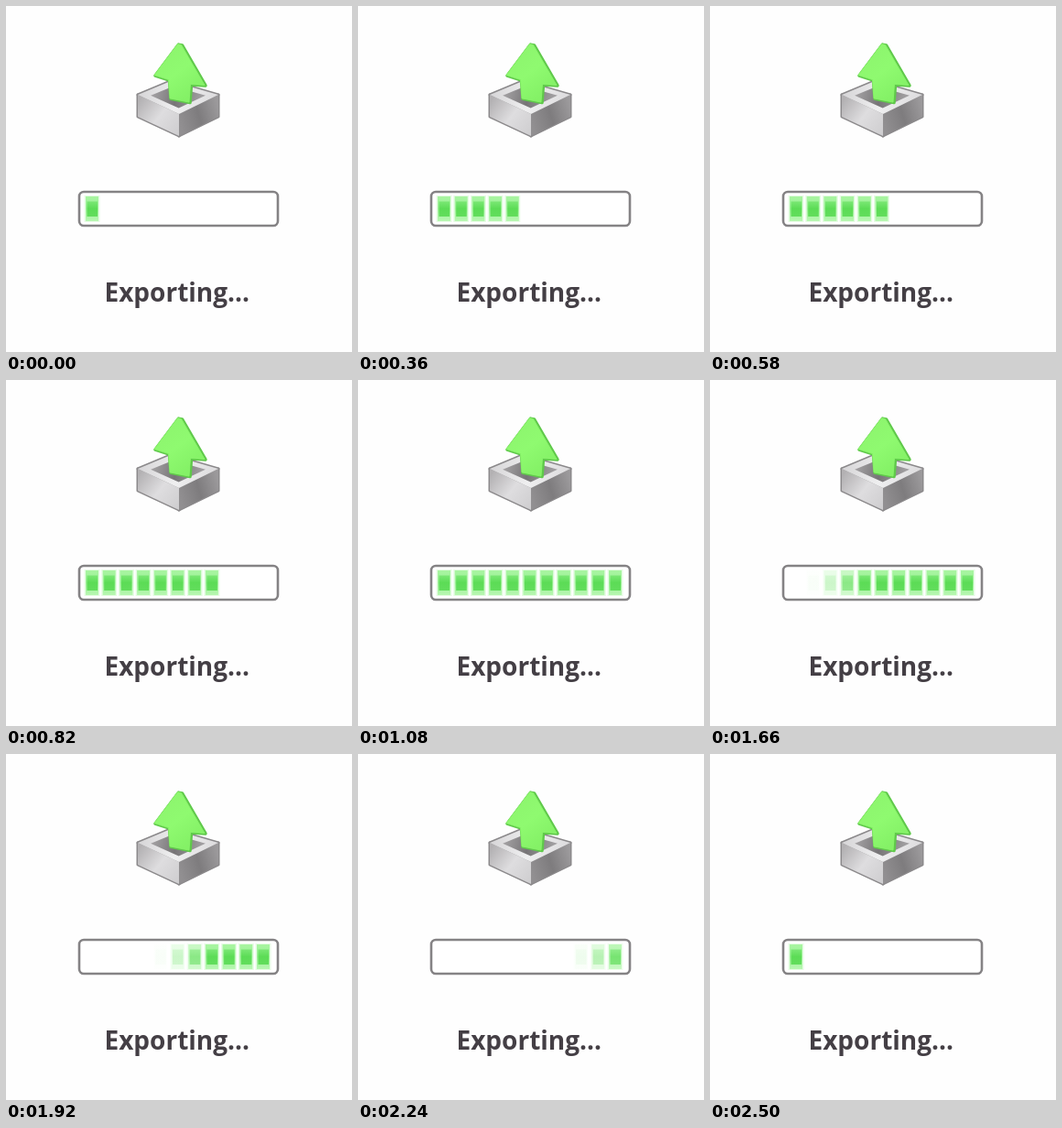
These frames come from a looping animation (378 px wide and 378 px high, 2.52 s). An HTML page with a canvas:

```html
<!DOCTYPE html>
<html lang="en">
<head>
<meta charset="utf-8">
<title>Exporting</title>
<style>
html, body { margin: 0; width: 100%; height: 100%; overflow: hidden; background: #fefefe; }
canvas { display: block; filter: blur(0.6px); }
</style>
</head>
<body>
<canvas id="stage" width="378" height="378"></canvas>
<script>
const ctx = document.getElementById('stage').getContext('2d');
const LOOP = 2520;
const BLOCKS = 11;
const FILL = { start: -104, step: 116 };
const CLEAR = { start: 1320, step: 87, fade: 300 };

function polygon(points, fill, stroke, width) {
  ctx.beginPath();
  points.forEach(([x, y]) => ctx.lineTo(x, y));
  ctx.closePath();
  ctx.fillStyle = fill;
  ctx.fill();
  if (!stroke) return;
  ctx.strokeStyle = stroke;
  ctx.lineWidth = width;
  ctx.lineJoin = 'round';
  ctx.stroke();
}

function gradient(x0, y0, x1, y1, ...colors) {
  const g = ctx.createLinearGradient(x0, y0, x1, y1);
  colors.forEach((c, i) => g.addColorStop(i / (colors.length - 1), c));
  return g;
}

const shift = (points, dx, dy) => points.map(([x, y]) => [x + dx, y + dy]);

function drawTray() {
  const rim = [[144, 97], [180, 82], [232, 97], [189, 118]];
  const [left, , right, front] = rim;
  const hole = rim.map(([x, y]) => [188 + (x - 188) * 0.68, 99 + (y - 99) * 0.66]);
  const side = (a, b) => [a, b, ...shift([b, a], 0, 24)];

  const leftFace = side(left, front);
  const rightFace = side(front, right);
  [leftFace, rightFace, rim].forEach(p => polygon(p, '#999', '#8b898b', 3));
  polygon(leftFace, gradient(144, 105, 188, 140, '#b3b1b3', '#dedddf', '#cfced0'));
  polygon(rightFace, gradient(189, 125, 232, 112, '#918f91', '#7e7c7e', '#9b999b'));
  polygon(rim, gradient(145, 90, 230, 110, '#d6d5d7', '#efeff0', '#dcdbdd'));
  polygon(hole, gradient(160, 92, 212, 106, '#a4a2a4', '#777577', '#a09ea0'));
}

function drawArrow() {
  // Half outline mirrored around the axis, then tilted.
  const half = [[2, 1], [27.5, 40], [12, 42], [10.5, 62]];
  const mirrored = half.map(([x, y]) => [-x, y]).reverse();
  const arrow = [...half, ...mirrored].map(([x, y]) => [189.5 + x, 41 + y + 0.2 * x]);
  polygon(shift(arrow, 1, 0.5), '#5fc94a', '#5fc94a', 3.5);
  polygon(arrow, gradient(170, 50, 204, 96, '#8df56e', '#8ffa70', '#84f166'), '#8cf56d', 0.8);
}

function drawBar() {
  ctx.beginPath();
  ctx.roundRect(80, 203, 217, 37, 5);
  ctx.fillStyle = '#fff';
  ctx.fill();
  ctx.strokeStyle = '#858385';
  ctx.lineWidth = 2.6;
  ctx.stroke();
}

function blockAlpha(i, t) {
  const on = FILL.start + i * FILL.step;
  const off = CLEAR.start + i * CLEAR.step;
  if (t < on) return 0;
  if (t >= on + LOOP) return 1;
  const faded = Math.min(1, Math.max(0, (t - off) / CLEAR.fade));
  return (1 - faded) ** 2;
}

function drawBlock(i, alpha) {
  const x = 87 + i * 18.7;
  ctx.globalAlpha = alpha;
  ctx.fillStyle = '#e6fce4';
  ctx.fillRect(x - 1.5, 207, 17, 29);
  ctx.fillStyle = gradient(0, 208, 0, 235, '#a9f5a2', '#98f092', '#b8f7b2');
  ctx.fillRect(x, 208, 14, 27);
  ctx.fillStyle = gradient(0, 213, 0, 230, '#7ce876', '#5cdc56', '#62dd5c');
  ctx.fillRect(x + 1.5, 213.5, 11.5, 16.5);
  ctx.globalAlpha = 1;
}

function drawLabel() {
  ctx.font = 'bold 28px "Open Sans", sans-serif';
  ctx.fillStyle = '#443f45';
  ctx.fillText('Exporting...', 107.5, 323);
}

function draw(t) {
  ctx.fillStyle = '#fefefe';
  ctx.fillRect(0, 0, 378, 378);
  drawTray();
  drawArrow();
  drawBar();
  for (let i = 0; i < BLOCKS; i++) drawBlock(i, blockAlpha(i, t));
  drawLabel();
}

const begin = performance.now();
function tick() {
  draw((performance.now() - begin) % LOOP);
  requestAnimationFrame(tick);
}
tick();
</script>
</body>
</html>
```
